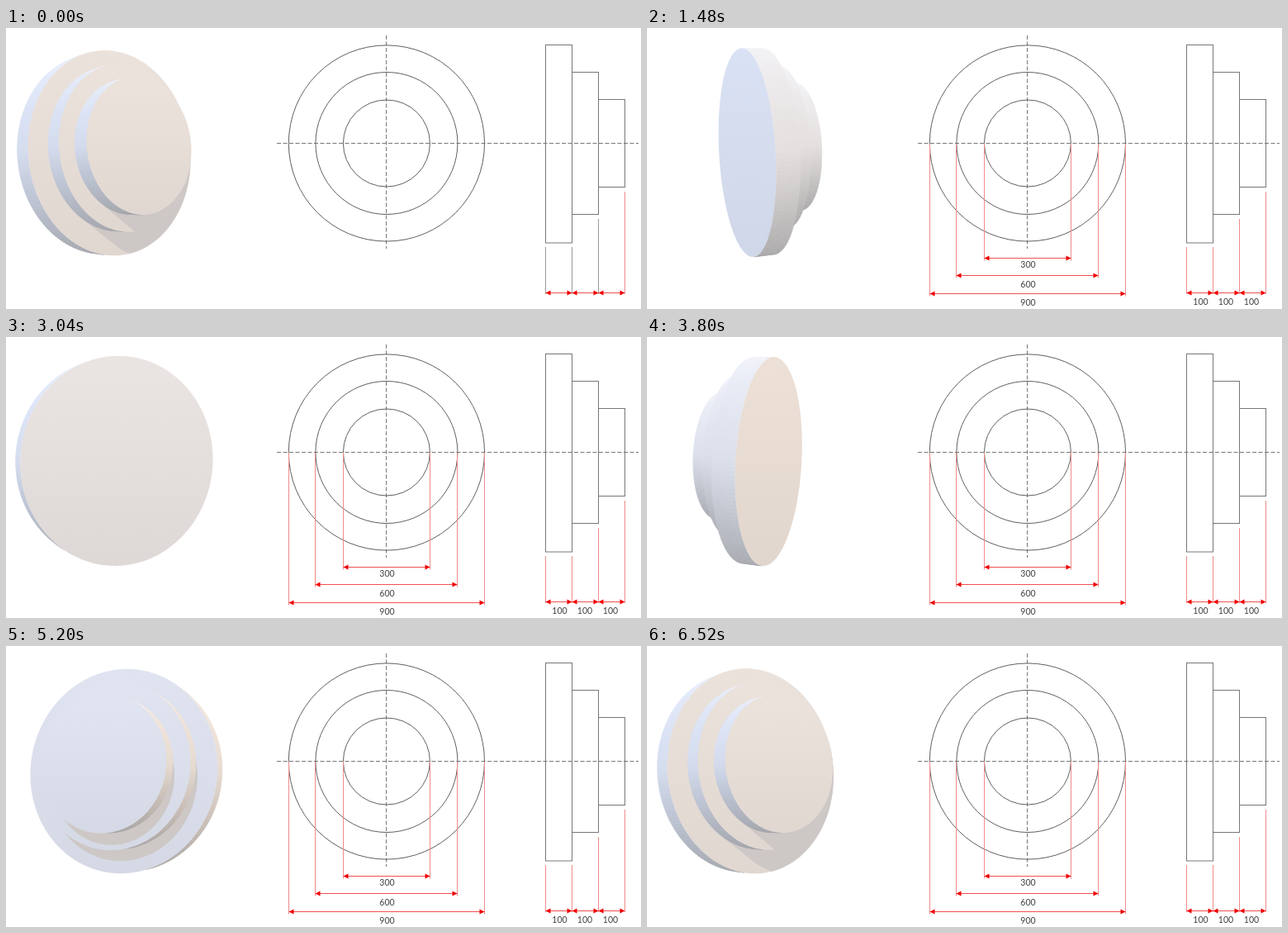
Recreate the animation shown at these times as an HTML page with a canvas. Size 769x340 px, loop 6.56 s.

```html
<!DOCTYPE html>
<html lang="en">
<head>
<meta charset="utf-8">
<title>Stepped disc</title>
<style>
html, body { margin: 0; width: 769px; height: 340px; overflow: hidden; background: #fff; }
canvas { display: block; }
</style>
</head>
<body>
<canvas id="stage" width="769" height="340"></canvas>
<script>
const ctx = document.getElementById('stage').getContext('2d');
const TAU = Math.PI * 2, LOOP = 6560, DEPTH = 600, CX = 135, CY = 150, SEGS = 180;

// Cylinders: radius, rear and front height along the axis, lift off the axis
const steps = [[122.5, -21, 4, 0], [98, 4, 26, 4], [78, 26, 48, 4]];
// Turn angle in degrees at given times
const keys = [[0, 38], [880, 74], [2040, 141], [3040, 203], [3800, 250], [5200, 336], [LOOP, 398]];
const light = [0.4, -0.6, -0.7];

const dot = (a, b) => a[0] * b[0] + a[1] * b[1] + a[2] * b[2];

function keyAt(i) {
  const n = keys.length - 1, turn = Math.floor(i / n), [t, a] = keys[i - turn * n];
  return [t + turn * LOOP, a + turn * 360];
}

// Smooth periodic interpolation through the keys
function angleAt(t) {
  let i = 0;
  while (t >= keys[i + 1][0]) i++;
  const [p, a, b, q] = [-1, 0, 1, 2].map(k => keyAt(i + k));
  const span = b[0] - a[0], k = (t - a[0]) / span;
  const m0 = (b[1] - p[1]) / (b[0] - p[0]) * span;
  const m1 = (q[1] - a[1]) / (q[0] - a[0]) * span;
  const k2 = k * k, k3 = k2 * k;
  return (2 * k3 - 3 * k2 + 1) * a[1] + (k3 - 2 * k2 + k) * m0 +
    (3 * k2 - 2 * k3) * b[1] + (k3 - k2) * m1;
}

// Cool light on the left, warm on the right, darker underneath
function shade(nx, ny, gain = 1) {
  const mid = [225, 226, 231], end = nx < 0 ? [212, 220, 238] : [231, 219, 210];
  const k = Math.min(1, Math.abs(nx) * 1.3), lum = gain * (1 + ny * (ny > 0 ? 0.08 : 0.27));
  return `rgb(${mid.map((m, i) => Math.min(255, Math.round((m + (end[i] - m) * k) * lum)))})`;
}

function trace(points) {
  ctx.beginPath();
  for (const p of points) ctx.lineTo(...p);
  ctx.closePath();
}

function drawSolid(angle) {
  const th = angle * Math.PI / 180, s = Math.sin(th), c = Math.cos(th);
  const ny = 0.06 + 0.02 * c;
  const n = [s, ny, c], u = [c, 0, -s], v = [-s * ny, 1, -c * ny];

  const radial = a => u.map((x, i) => x * Math.cos(a) + v[i] * Math.sin(a));
  const project = ([x, y, z]) => {
    const f = DEPTH / (DEPTH - z);
    return [CX + x * f, CY - y * f];
  };
  const rim = (r, h, a, du, dv) =>
    project(radial(a).map((w, i) => w * r + n[i] * h + u[i] * du + v[i] * dv));
  const ring = (r, h, lift) =>
    Array.from({ length: SEGS }, (_, i) => rim(r, h, i / SEGS * TAU, 0, lift));

  function face(r, h, lift, sign) {
    const g = ctx.createLinearGradient(0, CY - r, 0, CY + r);
    g.addColorStop(0, shade(sign * s, 0, 1.025));
    g.addColorStop(1, shade(sign * s, 0, 0.975));
    trace(ring(r, h, lift));
    ctx.fillStyle = g;
    ctx.fill();
  }

  function side([r, h0, h1, lift]) {
    for (let i = 0; i < SEGS; i++) {
      const a = i / SEGS * TAU, b = (i + 1) / SEGS * TAU, w = radial((a + b) / 2);
      if (DEPTH * w[2] < r) continue;
      trace([[h0, a], [h1, a], [h1, b], [h0, b]].map(([h, e]) => rim(r, h, e, 0, lift)));
      ctx.fillStyle = ctx.strokeStyle = shade(w[0], w[1]);
      ctx.fill();
      ctx.lineWidth = 0.5;
      ctx.stroke();
    }
  }

  // Shadow of the next step, swept across the face below it
  function shadow([r, , h, lift], [r2, low, high, lift2]) {
    const fall = -dot(light, n);
    if (fall < 0.1) return;
    const reach = (high - low) / fall;
    const du = dot(light, u) * reach, dv = dot(light, v) * reach;
    const along = Math.atan2(dv, du), outline = [];
    for (let i = 0; i <= SEGS; i++) {
      const a = along - Math.PI / 2 + i / SEGS * TAU, k = i <= SEGS / 2 ? 1 : 0;
      outline.push(rim(r2, h, a, du * k, lift2 + dv * k));
    }
    ctx.save();
    trace(ring(r, h, lift));
    ctx.clip();
    trace(outline);
    ctx.fillStyle = '#cdc8c6';
    ctx.fill();
    ctx.restore();
  }

  const order = c > 0 ? [0, 1, 2] : [2, 1, 0];
  for (const i of order) {
    const [r, , top, lift] = steps[i];
    side(steps[i]);
    if (DEPTH * c > top) {
      face(r, top, lift, 1);
      if (i < 2) shadow(steps[i], steps[i + 1]);
    }
  }
  const [r, rear] = steps[0];
  if (DEPTH * c < rear) face(r, rear, 0, -1);
}

function line(x0, y0, x1, y1, color, dash = []) {
  ctx.beginPath();
  ctx.setLineDash(dash);
  ctx.moveTo(x0, y0);
  ctx.lineTo(x1, y1);
  ctx.strokeStyle = color;
  ctx.lineWidth = 1;
  ctx.stroke();
  ctx.setLineDash([]);
}

function dimension(x0, x1, y) {
  line(x0, y, x1, y, '#f05050');
  ctx.fillStyle = '#f00000';
  for (const [x, d] of [[x0, 6], [x1, -6]]) {
    trace([[x, y], [x + d, y - 3], [x + d, y + 3]]);
    ctx.fill();
  }
}

function label(text, x, y) {
  ctx.font = '10.5px Lato, Carlito, "Open Sans", sans-serif';
  ctx.textAlign = 'center';
  ctx.textBaseline = 'middle';
  ctx.fillStyle = '#404040';
  ctx.fillText(text, x, y);
}

function drawPlan(full) {
  const mx = 460.9, my = 139.5, radii = [52.5, 86, 118.6];
  line(328, my, 766, my, '#777', [5, 2.5]);
  line(460.5, 9, 460.5, 267, '#777', [5, 2.5]);
  ctx.lineWidth = 1;
  ctx.strokeStyle = '#606060';
  for (const r of radii) {
    ctx.beginPath();
    ctx.arc(mx, my, r, 0, TAU);
    ctx.stroke();
  }
  ctx.strokeStyle = '#777';
  [[20.5, 239.5], [53.5, 172], [86.5, 106]].forEach(([y, h], i) =>
    ctx.strokeRect(653.5 + 32 * i, y, 32, h));

  [265, 265, 231, 198].forEach((y, i) => {
    const x = 653.5 + 32 * i;
    line(x, y, x, 322, full || i === 3 ? '#f08a8a' : '#999');
    if (i < 3) dimension(x, x + 32, 320.5);
  });
  if (!full) return;

  [[278.5, '300', 286.5], [299.5, '600', 310.5], [321.5, '900', 332.5]].forEach(([y, text, ty], i) => {
    const ends = [mx - radii[i], mx + radii[i]].map(x => Math.floor(x) + 0.5);
    for (const x of ends) line(x, 140, x, y + 3, '#f08a8a');
    dimension(...ends, y);
    label(text, 461.5, ty);
  });
  for (const x of [670.5, 701, 732]) label('100', x, 332);
}

function frame(now) {
  const t = Math.floor(now % LOOP / 40) * 40;
  ctx.fillStyle = '#fff';
  ctx.fillRect(0, 0, 769, 340);
  drawSolid(angleAt(t));
  drawPlan(t >= 40);
  requestAnimationFrame(frame);
}
frame(0);
</script>
</body>
</html>
```
